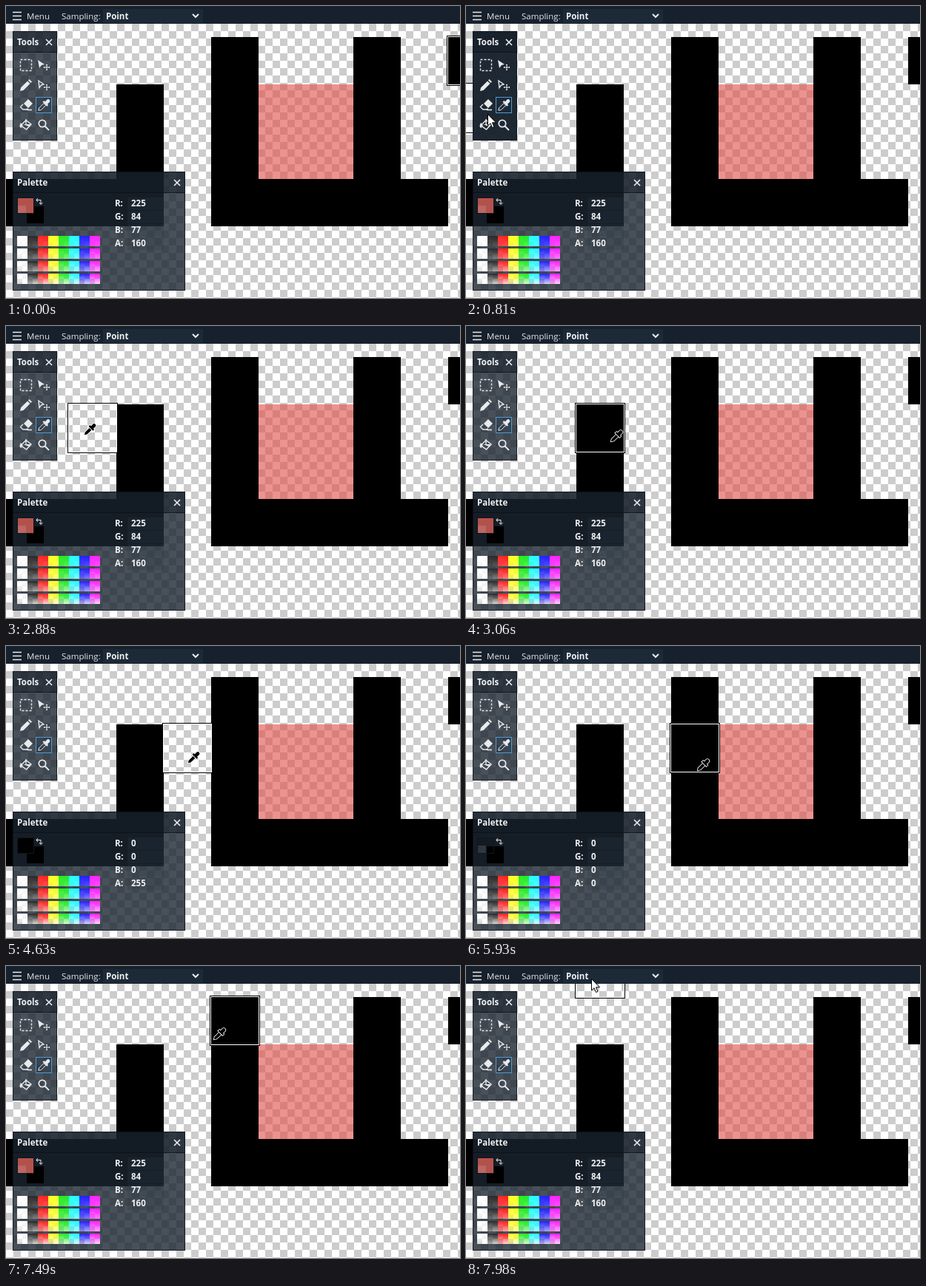
These frames come from a looping animation (613x395 px, 8 s). An HTML page:

```html
<!DOCTYPE html>
<html lang="en">
<head>
<meta charset="utf-8">
<title>Color picker</title>
<style>
html, body { margin: 0; width: 613px; height: 395px; overflow: hidden; background: #fff; }
svg { display: block; }
text { font: 11.5px "Open Sans", "Noto Sans", sans-serif; fill: #e4e7ea; }
.bold { font-weight: 700; fill: #f0f1f2; }
.line { fill: none; stroke: #e8eaec; stroke-width: 1.4; }
.thin { stroke-width: 1; }
.thick { stroke-width: 2; }
.fill { fill: #e8eaec; }
</style>
</head>
<body>
<svg width="613" height="395" viewBox="0 0 613 395">
  <defs>
    <pattern id="checks" width="20" height="20" patternUnits="userSpaceOnUse" patternTransform="translate(0 24)">
      <path fill="#fff" d="M0 0h20v20H0z"/>
      <path fill="#ccc" d="M10 0h10v10H10zM0 10h10v10H0z"/>
    </pattern>
    <pattern id="smallChecks" x="15" y="311" width="14" height="17" patternUnits="userSpaceOnUse">
      <path fill="#fff" d="M0 0h14v14H0z"/>
      <path fill="#ccc" d="M7 0h7v7H7zM0 7h7v7H0z"/>
    </pattern>
    <linearGradient id="fade" x2="0" y2="1">
      <stop offset="0" stop-color="#fff" stop-opacity="0"/>
      <stop offset="1" stop-color="#fff"/>
    </linearGradient>
    <mask id="lower" maskContentUnits="objectBoundingBox"><path fill="url(#fade)" d="M0 0H1V1H0Z"/></mask>
    <g id="x"><path class="line" d="M-4-4 4 4M4-4-4 4" style="stroke-width:1.7"/></g>
    <g id="move"><path class="line thin" d="M-4 0H4M0-4V4M-3-1-4 0-3 1M3-1 4 0 3 1M-1-3 0-4 1-3M-1 3 0 4 1 3"/></g>
    <path id="tube" d="M.8-.8 1.6-4 8-10.400 10.800-7.600 4.400-1.400Z"/>
    <path id="bulb" d="M6.500-12.300 8.500-13.900 9.800-12.600 12.300-15.200Q14-16.800 15.800-15 17.200-13.200 15.500-11.500L12.900-9.200 14.200-8 12.500-6.200Z"/>
  </defs>

  <rect width="613" height="395" fill="url(#checks)"/>
  <path d="M0 234H149V106H213V298H0ZM277 42H341V234H469V42H533V234H597V298H277ZM597 42H613V106H597Z"/>
  <path fill="#e1544d" fill-opacity=".627" d="M341 106H469V234H341Z"/>
  <g id="box" fill="none">
    <rect x="-1.5" y="-1.5" width="67" height="67" stroke="#000"/>
    <rect x="-.5" y="-.5" width="65" height="65" stroke="#fff"/>
  </g>

  <g id="tools">
    <rect id="toolsBg" x="9" y="34" width="60" height="148" fill="#1b2530"/>
    <rect x="9" y="34" width="60" height="29" fill="#111a25" fill-opacity=".45"/>
    <path fill="none" stroke="#0a0f16" stroke-opacity=".75" d="M9.5 34.5H68.5V181.5H9.5ZM9 62.5H69"/>
    <text class="bold" x="15" y="53">Tools</text>
    <use href="#x" x="58" y="49"/>
    <rect class="line" x="19.5" y="72.5" width="15" height="15" stroke-dasharray="3 2"/>
    <path class="fill" d="M43 73 52 79 48 80 45 84Z"/>
    <use href="#move" x="55" y="83"/>
    <path class="fill" d="M19 115 20 110.500 29 101.500 32.500 105 23.500 114ZM30 100.500 31.500 99 35 102.500 33.500 104Z"/>
    <path class="line" d="M44 101 51 106 47.500 107 45 110.500Z"/>
    <use href="#move" x="55" y="110"/>
    <path class="fill" d="M24 132 30 126 36 132 30 138Z"/>
    <path class="line" d="M23 133 19.500 136.500 23 140H28L29.500 138.500M28 140.500H35"/>
    <rect x="40.500" y="123.500" width="21" height="21" fill="#172d40" fill-opacity=".3" stroke="#4d9bcf"/>
    <use href="#tube" x="43" y="142" class="line thin"/>
    <use href="#bulb" x="43" y="142" class="fill"/>
    <path class="line" d="M21.500 160 27 154.500 34 160 27.500 167 22 163ZM27 160V153"/>
    <path class="fill" d="M20 158Q17 163 20 165 23 164 21 159ZM23 160H33L31 163Z"/>
    <circle class="line" cx="49" cy="159" r="4.700" style="stroke-width:1.8"/>
    <path class="line thick" d="M52.500 162.500 58 168"/>
  </g>

  <g id="palette">
    <rect x="9" y="224" width="233" height="161" fill="#1b2530" fill-opacity=".8"/>
    <rect x="9" y="224" width="233" height="29" fill="#111a25" fill-opacity=".45"/>
    <path fill="none" stroke="#0a0f16" stroke-opacity=".75" d="M9.5 224.5H241.5V384.5H9.5ZM9 252.5H242"/>
    <text class="bold" x="15" y="243">Palette</text>
    <use href="#x" x="231" y="239"/>
    <path d="M28 271H51V294H28Z"/>
    <rect id="ink" x="15.5" y="259.5" width="22" height="21" stroke="#10161d"/>
    <path id="sheen" fill="#fff" fill-opacity=".12" d="M16 270H27V280H16Z"/>
    <path class="line thin" d="M43 260 41 262.500 43 265M41 262.500H47V268M45 266 47 268.500 49.500 266"/>
    <g id="fields"></g>
    <g id="colors"></g>
  </g>

  <g id="bar">
    <path fill="#17202d" d="M0 0H613V24H0Z"/>
    <path fill="#1c2a38" d="M131 4H266V23H131Z"/>
    <path class="line" d="M9 8.500H21M9 13.500H21M9 18.500H21"/>
    <text x="28" y="18">Menu</text>
    <text x="75" y="18">Sampling:</text>
    <text class="bold" x="135" y="18">Point</text>
    <path class="line thick" d="M252 11 256 15 260 11"/>
  </g>

  <g id="tip">
    <path fill="#2b2b2b" stroke="#777" d="M64.500 152.500H160.500V176.500H64.500Z"/>
    <text x="72" y="169" style="font-size:11px">Color Picker (K)</text>
  </g>
  <g id="arrow">
    <path fill="#fff" stroke="#000" d="M.5.5V16L4 12.700 6.500 18.500 9 17.500 6.500 11.800H11.500Z"/>
  </g>
  <g id="pick" stroke="#fff" stroke-width="1.6" paint-order="stroke">
    <use href="#tube"/>
    <use href="#bulb"/>
  </g>
</svg>
<script>
const $ = id => document.getElementById(id);
const add = (parent, tag, attrs, text) => {
  const el = document.createElementNS("http://www.w3.org/2000/svg", tag);
  for (const key in attrs) el.setAttribute(key, attrs[key]);
  if (text) el.textContent = text;
  parent.append(el);
  return el;
};
const show = (id, on) => $(id).setAttribute("display", on ? "inline" : "none");
const place = (id, x, y) => $(id).setAttribute("transform", `translate(${x} ${y})`);

const values = [..."RGBA"].map((name, i) => {
  const y = 271 + i * 18;
  add($("fields"), "rect", { x: 164, y: y - 12, width: 49, height: 17, fill: "#2b3946", "fill-opacity": .25 });
  add($("fields"), "text", { x: 147, y, class: "bold" }, name + ":");
  return add($("fields"), "text", { x: 169, y, class: "bold" });
});

const hues = ["#fff", "#2b2b2b", "#f22", "#ff2", "#2e2", "#2ff", "#22f", "#f2f"];
for (let row = 0; row < 4; row++) {
  const strip = { x: 15, y: 311 + row * 17, width: 112, height: 14 };
  hues.forEach((fill, i) => add($("colors"), "rect", { ...strip, x: 15 + i * 14, width: 14, fill }));
  add($("colors"), "rect", {
    ...strip, fill: "url(#smallChecks)", mask: "url(#lower)", opacity: .2 + row * .2
  });
}

// time, cursor, x, y
const path = [
  [0, "", 640, 74], [730, "pick", 4, 150], [810, "arrow", 29, 146], [920, "arrow", 38, 144],
  [1010, "arrow", 45, 141], [1100, "arrow", 50, 140], [1200, "arrow", 53, 139], [1290, "arrow", 54, 138],
  [1380, "arrow", 55, 138],
  [2790, "arrow", 60, 139], [2870, "pick", 105, 148], [2960, "pick", 165, 156], [3060, "pick", 195, 157],
  [3190, "pick", 190, 155], [3280, "pick", 187, 153], [3370, "pick", 185, 152], [3450, "pick", 184, 151],
  [3540, "pick", 183, 151], [4630, "pick", 245, 159],
  [5810, "pick", 260, 161], [5910, "pick", 312, 169], [6020, "pick", 374, 180], [6130, "pick", 410, 190],
  [6230, "pick", 409, 198], [6340, "pick", 404, 202], [6440, "pick", 403, 202],
  [7380, "pick", 372, 174], [7480, "pick", 280, 100], [7570, "pick", 196, 35], [7670, "arrow", 166, 20],
  [7810, "arrow", 160, 13], [7900, "arrow", 164, 15], [7980, "arrow", 169, 17]
];
const red = [225, 84, 77, 160];
const inks = [[0, red], [3930, [0, 0, 0, 255]], [5220, [0, 0, 0, 0]], [6600, red]];

const last = (list, t) => list.findLast(step => step[0] <= t);
const inTools = ([, , x, y]) => x >= 9 && x < 69 && y >= 34 && y < 182;
const cell = (v, start) => start + Math.floor((v - start) / 64) * 64;

function draw(t) {
  const step = last(path, t), [, cursor, x, y] = step;
  const over = inTools(step);
  // The cell outline stays put while the pointer is over the panel.
  const [, , bx, by] = path.findLast(s => s[0] <= t && !inTools(s));
  place("box", cell(bx, 21), cell(by, 42));
  $("toolsBg").setAttribute("fill-opacity", over ? .98 : .8);
  for (const id of ["arrow", "pick"]) {
    show(id, id === cursor);
    place(id, x, y);
  }
  show("tip", t >= 1910 && t < 2790);

  const ink = last(inks, t)[1], alpha = ink[3];
  values.forEach((el, i) => el.textContent = ink[i]);
  $("ink").setAttribute("fill", alpha === 160 ? "#b3524c" : "#000");
  $("ink").setAttribute("fill-opacity", alpha ? 1 : .1);
  show("sheen", alpha < 255);
}

const start = performance.now();
function tick() {
  draw((performance.now() - start) % 8000);
  requestAnimationFrame(tick);
}
draw(0);
tick();
</script>
</body>
</html>
```
